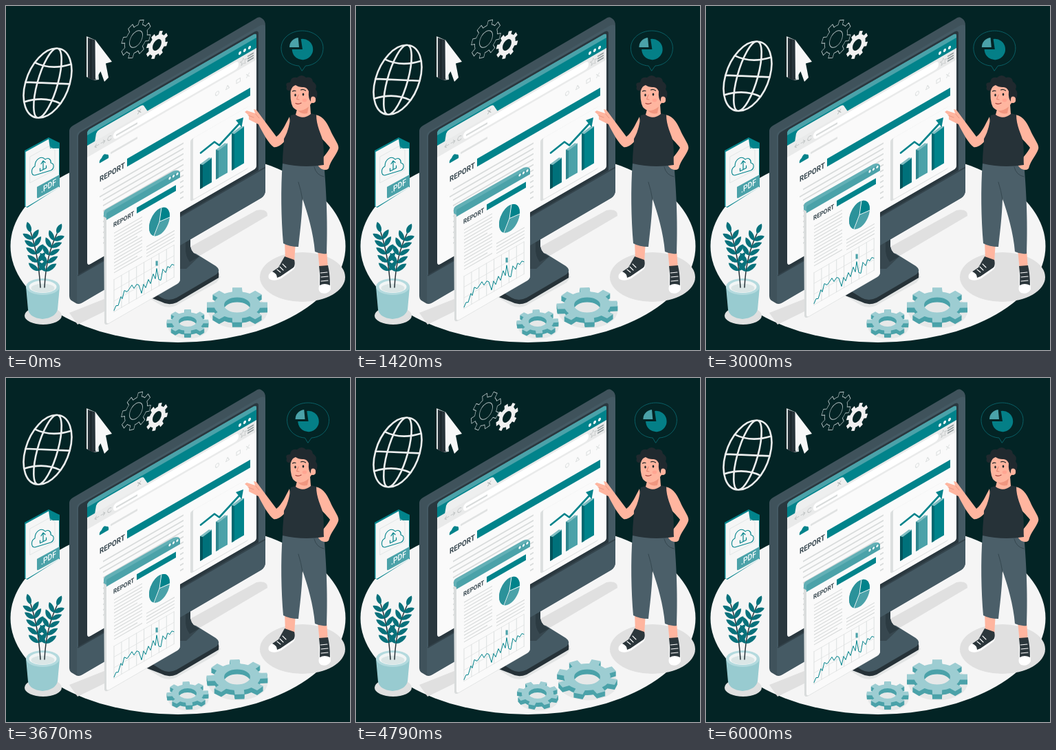
An HTML page with a canvas that plays this animation: 500x500 px, repeating every 6.04 s.

```html
<!DOCTYPE html>
<html lang="en">
<head>
<meta charset="utf-8">
<title>Report</title>
<style>
html, body { margin: 0; width: 100%; height: 100%; overflow: hidden; background: #032425; }
canvas { display: block; width: 500px; height: 500px; }
</style>
</head>
<body>
<canvas id="stage" width="500" height="500"></canvas>
<script>
const ctx = document.getElementById('stage').getContext('2d');
const LOOP = 6040, SPAN = 6000, TAU = Math.PI * 2, SLOPE = 0.577;
const BG = '#032425', TEAL = '#01838b', MID = '#4ba2a9', PALE = '#9dcdd2';
const SLATE = '#455a64', DEEP = '#37474f', INK = '#263238', WHITE = '#fafafa';
const SKIN = '#ffb59f', GREY = '#e0e0e0';

// position of each turning point of the shake, evenly spaced over the span
const SHAKE = [0, -1, 2, -4, 4, -4, 4, -4, 2, -1, 0];

function shake(p) {
  const i = Math.min(9, Math.floor(p * 10));
  return SHAKE[i] + (SHAKE[i + 1] - SHAKE[i]) * (p * 10 - i);
}

function fill(d, color) {
  ctx.fillStyle = color;
  ctx.fill(new Path2D(d));
}

function line(d, color, w = 1) {
  ctx.strokeStyle = color;
  ctx.lineWidth = w;
  ctx.stroke(new Path2D(d));
}

function oval(x, y, rx, ry, color) {
  ctx.beginPath();
  ctx.ellipse(x, y, rx, ry, 0, 0, TAU);
  ctx.fillStyle = color;
  ctx.fill();
}

function box(x, y, w, h, color, r = 0) {
  ctx.beginPath();
  ctx.roundRect(x, y, w, h, r);
  ctx.fillStyle = color;
  ctx.fill();
}

function at(x, y, draw) {
  ctx.save();
  ctx.translate(x, y);
  draw();
  ctx.restore();
}

// upright isometric plane: x keeps screen width, y follows the slope
function wall(x, y, draw) {
  ctx.save();
  ctx.transform(1, -SLOPE, 0, 1, x, y);
  draw();
  ctx.restore();
}

function label(s, x, y, size, color, weight = 700) {
  ctx.save();
  ctx.translate(x, y);
  ctx.scale(0.866, 1);
  ctx.font = `${weight} ${size}px Roboto, "Liberation Sans", sans-serif`;
  ctx.fillStyle = color;
  ctx.fillText(s, 0, 0);
  ctx.restore();
}

function sector(x, y, rx, ry, a, b, color) {
  ctx.beginPath();
  ctx.moveTo(x, y);
  ctx.ellipse(x, y, rx, ry, 0, a, b);
  ctx.closePath();
  ctx.fillStyle = color;
  ctx.fill();
}

function gear(r, hole, turn) {
  const path = new Path2D(), step = TAU / 8;
  const knots = [[-0.27, 0.76], [-0.2, 1], [0.2, 1], [0.27, 0.76]];
  for (let i = 0; i < 8; i++) {
    for (const [k, f] of knots) {
      const a = turn + (i + k) * step;
      path.lineTo(r * f * Math.cos(a), r * f * Math.sin(a));
    }
    path.arc(0, 0, r * 0.76, turn + (i + 0.27) * step, turn + (i + 0.73) * step);
  }
  path.closePath();
  path.moveTo(hole, 0);
  path.arc(0, 0, hole, 0, TAU);
  return path;
}

function flatGear(x, y, r, hole, depth, turn) {
  const g = gear(r, hole, turn);
  oval(x + 1, y + depth + 2, r * 0.97, r * 0.56, '#e6e8e8');
  for (let d = depth; d >= 0; d--) {
    ctx.save();
    ctx.transform(1, 0, 0, SLOPE, x, y + d);
    ctx.fillStyle = d ? MID : PALE;
    ctx.fill(g, 'evenodd');
    ctx.restore();
  }
}

function wallGear(x, y, r, hole, turn, solid) {
  ctx.save();
  ctx.transform(0.866, -0.5, 0, 1, x, y);
  const g = gear(r, hole, turn + TAU / 16);
  if (solid) {
    ctx.fillStyle = '#f0f0f0';
    ctx.fill(g, 'evenodd');
  } else {
    ctx.strokeStyle = '#b9c5c6';
    ctx.lineWidth = 0.9;
    ctx.stroke(g);
  }
  ctx.restore();
}

function globe(y) {
  const p = new Path2D(), q = new Path2D();
  p.arc(0, 0, 0.97, 0, TAU);
  p.moveTo(0.45, 0); p.ellipse(0, 0, 0.45, 0.97, 0, 0, TAU);
  p.moveTo(-0.97, 0); p.lineTo(0.97, 0);
  p.moveTo(-0.8, -0.55); p.quadraticCurveTo(0, -0.35, 0.8, -0.55);
  p.moveTo(-0.8, 0.55); p.quadraticCurveTo(0, 0.35, 0.8, 0.55);
  q.addPath(p, new DOMMatrix([36, -19, 0, 48.5, 60.5, 112 + y]).rotate(23));
  ctx.strokeStyle = '#eceeee';
  ctx.lineWidth = 2.6;
  ctx.stroke(q);
}

function cursor() {
  fill('M117 44L131 50L135 107L128 108L117 103Z', '#dfe4e4');
  fill('M119 46L131 50V107L127 108L119 104Z', INK);
  line('M123.500 49V106', '#10191c', 1);
  fill('M129.500 49L154 81L145 83.500L149 104L143 110L137.500 95L130 107Z', '#f7f7f7');
}

function pdf() {
  fill('M27 210L62 191L78 199V263L31 293L27 291Z', TEAL);
  fill('M28.500 212L62 193.500L77 205V264L30 292L28.500 291Z', '#f5f6f6');
  fill('M62 193L78 199L77 207L64 207Z', TEAL);
  line('M35 219L62 204L71 209V238L35 257Z', '#dde2e2', 0.8);
  line('M42 246C36 246 36 236 42 233C42 222 52 217 57 223C62 219 66 224 65 228C71 229 70 237 65 239Z', TEAL, 1.1);
  line('M54 237V226M51 229.500L54 225L57 227.500M49.500 236V240L58.500 235.500V232', TEAL, 1.2);
  fill('M45 263L78 245V260Q78 262 76 263L47 279Q45 280 45 278Z', MID);
  wall(49, 273, () => label('.PDF', 2, 0, 12, '#fff', 500));
}

function monitor() {
  fill('M92 446L104 463L145 443V425Z', GREY);
  fill('M266 351L364 297Q381 294 380 305L292 357L266 372Z', GREY);
  fill('M204 422L255 392L312 393L306 402L246 436Q235 440 225 435Z', '#e2e4e4');
  fill('M200 412L253 370Q263 360 276 362L304 379Q311 385 309 395L248 431Q236 436 226 430L200 420Z', INK);
  fill('M200 408L253 370Q263 356 276 360L305 378Q313 384 306 390L248 424Q236 430 226 424Z', SLATE);
  fill('M245 335H268V350Q270 360 281 364L262 382L245 382Z', DEEP);
  fill('M261 330H268V350Q270 360 281 364L267 372Q260 363 261 350Z', '#2c3b42');

  fill('M92 182Q92 177 97 174L362 19Q368 14 372 18Q377 21 377 28V268Q377 275 371 279L111 431Q105 435 100 431L95 428Q92 426 92 421Z', '#3f525b');
  fill('M103 189Q103 184 108 181L368 29Q377 24 377 33V268Q377 275 371 279L111 431Q103 435 103 427Z', SLATE);
  fill('M105 190Q105 186 109 183L362 37Q367 35 367 40V239L105 392Z', '#2a383f');
  line('M105 391.500L376 235', '#33434b', 2);
}

function browser() {
  wall(118, 183, () => {
    ctx.save();
    ctx.beginPath();
    ctx.roundRect(0, -2, 246, 197, [5, 4, 4, 5]);
    ctx.clip();
    box(0, -2, 246, 197, WHITE);
    box(0, -2, 246, 23, TEAL);
    box(0, -2, 246, 7, MID);
    fill('M11 21L13 10Q14 7 18 7H77Q82 7 83 11L88 21Z', '#eeefef');
    line('M73.500 11.500L78 16.500M73.500 16.500L78 11.500', '#a9afaf', 0.9);
    for (const x of [222, 229, 236]) oval(x, 13.5, 2, 2.3, '#fff');
    box(0, 20, 246, 17, '#e9eaea');
    box(38, 23, 182, 11, '#fff', 5);
    box(42, 28, 31, 2.5, '#d8dbdb');
    line('M17 28H11L13.500 25.500M11 28L13.500 30.500M20 28H26L23.500 25.500M26 28L23.500 30.500M35 26A3 3 0 1 0 35 30', '#c2c6c6', 1);
    line('M227 24L228.500 27H232L229 29L230 33L227 31L224 33L225 29L222 27H225.500Z', '#c2c6c6', 0.7);
    for (const y of [24, 27.5, 31]) box(233, y, 9, 1.6, '#8d9698');
    ctx.restore();
  });
  wall(118, 186, () => {
    fill('M18 53Q17 48 21 47Q24 41 28 46Q32 47 31 53Z', TEAL);
    box(34, 46, 39, 3, '#e0e2e2');
    line('M186.500 50A2.500 2.700 0 1 0 191.500 50A2.500 2.700 0 1 0 186.500 50M201.500 52L204 47L206.500 52ZM217 47H222.500V52H217Z', '#dcdfdf', 1);
    line('M231.500 47L235.500 52M231.500 52L235.500 47', '#dcdfdf', 1);
    box(58, 69.5, 179, 11.5, TEAL);
    label('REPORT', 18, 80.5, 11.3, DEEP);
    for (let k = 0; k < 11; k++) {
      const x = k === 1 ? 18 : 23;
      box(x, 93 + k * 7.8, 140 - x, 2, '#d8dbdb');
    }
    box(150, 95, 85, 90, '#dcdfdf', 3);
    box(154, 95, 83, 89, WHITE, 2);
  });
  bar(282, 299, 230, 266, '#00717a', '#00525a');
  bar(305, 322, 209, 252, MID, '#2f858d');
  bar(328, 346, 185, 239, TEAL, '#006a72');
  line('M283 213.500L303 197.500L310 202.500L339 171', TEAL, 2.6);
  fill('M334 166L345 162L342.500 176Z', TEAL);
}

function bar(x0, x1, top, foot, face, side) {
  const h = (x1 - x0) * SLOPE;
  fill(`M${x0} ${top}V${foot}L${x1} ${foot - h}V${top - h}Z`, face);
  fill(`M${x0} ${top}V${foot}L${x0 + 4} ${foot - 2}V${top}Z`, side);
  fill(`M${x0} ${top}L${x1 - 4} ${top - h}L${x1} ${top - h + 1}L${x0 + 4} ${top + 1}Z`, '#7fbcc1');
}

const TREND = 'M0 0L3 -7L6 -7L10 -20L12 -17L15 -29L19 -27L22 -31L26 -37L29 -32L33 -38L36 -37L40 -25'
  + 'L43 -38L46 -33L50 -45L53 -39L57 -53L60 -46L62 -61L65 -45L68 -44L71 -60L75 -55L78 -64L81 -62L84 -67L87 -66';

function sheet(y) {
  at(146, 301 + y, () => {
    fill('M-3 2L0 0V162L-3 159Z', '#cfd3d3');
    fill('M-4 0Q-4 -4 0 -6L97 -61Q107 -65 107 -58V96Q107 100 103 103L3 161Q-3 164 -3 158Z', '#d9dcdc');
    wall(0, 0, () => box(0, 2, 107, 160, WHITE, 4));
    fill('M-4 0Q-4 -4 0 -6L97 -61Q107 -64 107 -57V-53L1 8L-4 5Z', '#63b0b6');
    wall(0, 0, () => {
      box(0, 0, 107, 10, MID, [2, 4, 0, 0]);
      for (const x of [92, 97.5, 103]) oval(x, 2.5, 1.6, 1.8, '#fff');
      label('REPORT', 10, 26.5, 9.3, DEEP);
      box(44, 17.5, 57, 8.5, TEAL);
      for (let k = 0; k < 13; k++) box(11, 35 + k * 4.8, k % 6 === 5 ? 34 : 41, 1.1, '#d3d6d6');
      for (let k = 0; k < 4; k++) box(58, 82 + k * 4.8, 41, 1.1, '#d3d6d6');
      sector(77, 57, 15, 19, 0, TAU, MID);
      sector(77, 57, 15, 19, 2.1, 4.9, '#2b929a');
      sector(77, 57, 15, 19, -1.38, 0.1, TEAL);
      line('M77 57L80 38M77 57L92 59M77 57L69 73', WHITE, 1);
      for (let k = 0; k <= 8; k++) line(`M${11 + k * 10.9} 103V150`, '#d6dada', 0.7);
      for (let k = 0; k <= 3; k++) line(`M11 ${103 + k * 15.6}H98`, '#dfe2e2', 0.7);
    });
    at(11, 141.5, () => {
      line(TREND, TEAL, 1);
      box(60.5, -72, 3.2, 7, MID);
    });
  });
}

function bubble(dx) {
  at(430.5 + dx, 62, () => {
    line('M-5 25C-20 24 -30.500 13 -30.500 -1C-30.500 -15 -17 -26 0 -26C17 -26 30.500 -15 30.500 -1C30.500 13 20 24 5 25L0 32Z', '#0b666c', 0.9);
    sector(0.5, 1, 15.2, 15.2, -1.72, Math.PI, '#047f87');
    sector(-4.5, -2, 14, 14, Math.PI, Math.PI * 1.47, MID);
  });
}

function leaf(x, y, len, turn) {
  at(x, y, () => {
    ctx.rotate(turn);
    fill(`M0 0C${len * 0.25} -5 ${len * 0.7} -5 ${len} 0C${len * 0.7} 4 ${len * 0.25} 4 0 0Z`, '#08717b');
  });
}

function stem(x, y, cx, cy, ex, ey, n, len) {
  line(`M${x} ${y}Q${cx} ${cy} ${ex} ${ey}`, INK, 1.5);
  for (let i = 1; i <= n; i++) {
    const t = 0.12 + 0.88 * i / n, s = 1 - t;
    const px = s * s * x + 2 * s * t * cx + t * t * ex;
    const py = s * s * y + 2 * s * t * cy + t * t * ey;
    const a = Math.atan2(s * (cy - y) + t * (ey - cy), s * (cx - x) + t * (ex - cx));
    const size = len * (1 - 0.2 * t);
    if (i === n) leaf(px, py, size, a);
    else {
      leaf(px, py, size, a - 0.8);
      leaf(px, py, size, a + 0.8);
    }
  }
}

function plant() {
  oval(54, 450, 27, 13, GREY);
  fill('M29 408L32 441Q34 453 53 455Q72 453 75 441L78 408Z', '#98cbd0');
  oval(53.5, 408, 24.5, 12, '#b4dade');
  oval(53.5, 408, 20, 9, '#f2f6f6');
  oval(53.5, 410, 17, 6.5, '#dbe6e6');
  stem(50, 409, 47, 362, 36, 329, 6, 20);
  stem(56, 409, 58, 364, 74, 331, 6, 20);
}

function shoes() {
  fill('M405 365L419 370Q422 378 418 383L400 396Q390 401 383 397Q379 392 385 387L396 380Z', '#fff');
  fill('M405 364L419 369Q421 376 418 380L399 393L394 395Q394 389 387 386L396 380Z', '#2b363b');
  line('M394 383L399 387M398 379L403 384M402 375L407 380', '#fff', 1.1);
  fill('M455 379L468 378Q472 392 472 412Q467 420 458 417Q453 414 455 407Z', '#fff');
  fill('M455 378L468 377Q471 390 471 406Q463 402 456 406Q457 392 455 378Z', '#2b363b');
  line('M458 400L468 399M458 394L468 393M457 388L467 387', '#fff', 1.1);
}

function man() {
  oval(431, 394, 62, 36, GREY);
  fill('M405 340H421L419 374L406 372Z', SKIN);
  fill('M453 354H466L468 383L456 384Z', SKIN);
  shoes();
  fill('M402 228H462C465 260 468 310 466 360Q457 361 449 357C447 330 438 300 431 280C430 310 427 330 425 350Q412 350 403 345C400 310 399 265 402 228Z', '#4b5f69');
  line('M431 282Q429 268 425 256M448 234Q451 246 462 248', '#35474f', 1);

  fill('M450 158C462 160 468 172 473 184C478 194 485 203 483 208C480 217 472 224 469 236C465 241 455 237 453 230C459 222 467 214 471 206C466 199 457 192 450 180Z', SKIN);
  fill('M412 161C406 172 401 184 393 190L372 162L364 151L360 150L362 156L350 152L347 154L353 159L353 165L361 169L367 172C374 186 382 200 389 205C397 207 409 194 415 184Z', SKIN);
  line('M352 159L360 162M363 157L368 163', '#e58f7c', 0.8);
  fill('M414 159L421 157Q431 166 443 156L451 158C451 174 458 186 460 194C463 207 461 221 462 231Q432 236 402 229C402 214 404 201 404 193C411 181 412 170 414 159Z', INK);
  fill('M421 158L424 146L442 143L443 157Q432 166 421 158Z', SKIN);
  fill('M424 151Q433 153 440 146L438 156Q428 158 424 151Z', '#f0967f');

  fill('M414 118Q412 138 417 147Q423 154 432 151Q440 148 444 141Q451 141 450 133L444 112L420 110Z', SKIN);
  fill('M414 123Q406 124 408 117Q405 111 413 111Q414 102 423 104Q430 98 436 104Q445 102 446 110Q453 114 450 121Q455 128 450 136Q449 130 444 132L443 139Q439 134 440 124Q437 117 431 118Q425 118 421 115Q416 116 414 123Z', '#20292e');
  oval(446.5, 136.5, 3.6, 4.4, SKIN);
  oval(420.5, 129.5, 1.2, 1.9, '#22282b');
  oval(432, 128.5, 1.3, 2, '#22282b');
  line('M416.500 124Q418.500 122.500 421 123.500M428.500 122Q432 120.500 435.500 123', '#22282b', 1.2);
  line('M425 129L422.500 135.500L426 136', '#e27f6c', 1);
  line('M421 141.500Q425 143.500 429 141', '#a4433c', 1.2);
  oval(434, 137, 3.3, 2.4, '#ffa592');
}

function frame() {
  const p = Math.min(performance.now() % LOOP, SPAN) / SPAN;
  const lift = -10 * (1 - Math.abs(1 - 2 * p));
  const spin = p * TAU;
  ctx.lineCap = ctx.lineJoin = 'round';
  ctx.fillStyle = BG;
  ctx.fillRect(0, 0, 500, 500);
  oval(250, 349, 243.5, 140, '#f5f5f5');
  globe(lift);
  cursor();
  wallGear(189, 48, 25, 11, spin, false);
  wallGear(219.5, 56.5, 18.5, 7.5, spin, true);
  monitor();
  browser();
  pdf();
  plant();
  sheet(lift);
  flatGear(336, 434.5, 44.5, 19, 7, spin);
  flatGear(264, 458.5, 30.5, 13, 6, spin);
  man();
  bubble(shake(p) * 2.8);
  requestAnimationFrame(frame);
}
frame();
</script>
</body>
</html>
```
